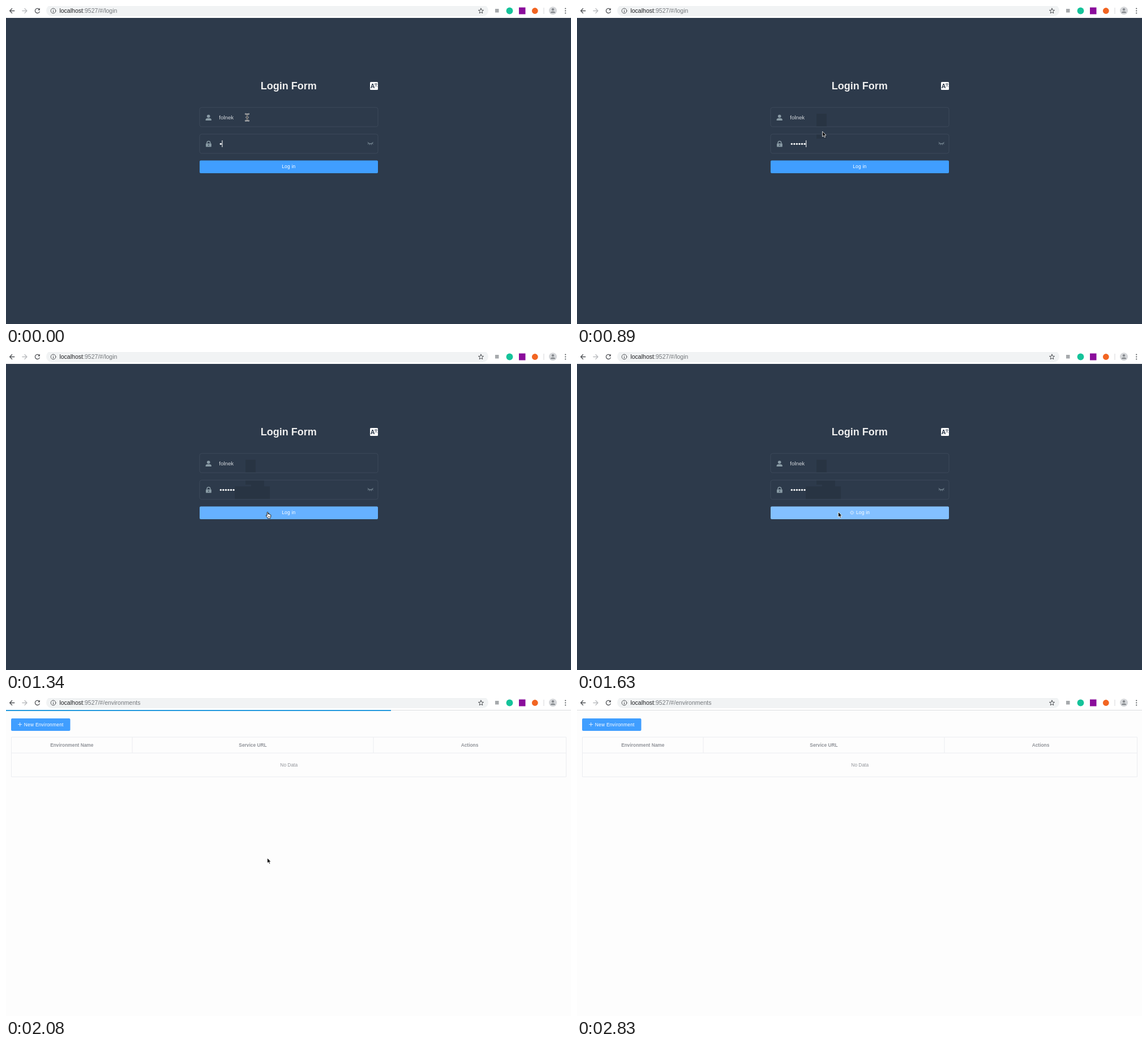
An HTML page that plays this animation: 998 by 561 pixels, repeating every 3.28 s.

```html
<!DOCTYPE html>
<html lang="en">
<head>
<meta charset="utf-8">
<title>Login</title>
<style>
  html, body { margin: 0; width: 100%; height: 100%; overflow: hidden; background: #fdfdfd; }
  svg { display: block; position: absolute; left: 0; top: 0; }
  text { font-family: "Liberation Sans", Arial, sans-serif; font-size: 8.4px; }
  .mid { text-anchor: middle; }
  .btn { fill: #fff; letter-spacing: .25px; }
  .th { fill: #909399; font-weight: bold; text-anchor: middle; }
  .line { fill: none; stroke-linecap: round; stroke-linejoin: round; }
</style>
</head>
<body>
<svg width="998" height="561" viewBox="0 0 998 561">
  <defs>
    <clipPath id="fields">
      <rect x="342" y="179" width="315" height="34" rx="3.5"/>
      <rect x="342" y="226" width="315" height="34" rx="3.5"/>
    </clipPath>
  </defs>

  <g id="login">
    <rect y="21" width="998" height="540" fill="#2d3a4b"/>
    <text class="mid" x="499.3" y="147" style="font-size:18px;font-weight:bold" fill="#eee">Login Form</text>
    <rect x="643" y="134" width="14" height="14" rx="1.5" fill="#fff"/>
    <text x="643.8" y="145.2" style="font-size:10.5px;font-weight:bold" fill="#2d3a4b">A</text>
    <path class="line" d="M651 137.5H656M653.5 136.4V137.5M652 138C652.8 140 654 141.2 655.6 142M655 138C654.4 140 653.2 141.2 651.8 142" stroke="#2d3a4b" stroke-width=".7"/>

    <g id="shades" clip-path="url(#fields)" fill="#283443"></g>
    <g fill="none" stroke="#3c495a">
      <rect x="342" y="179" width="315" height="34" rx="3.5"/>
      <rect x="342" y="226" width="315" height="34" rx="3.5"/>
    </g>

    <g fill="#889aa4">
      <circle cx="357.7" cy="194.5" r="2.8"/>
      <path d="M352.6 202V200.6C352.6 198.6 354.4 198 357.7 198S362.8 198.6 362.8 200.6V202Z"/>
      <path fill-rule="evenodd" d="M353.8 242.4H362Q362.8 242.4 362.8 243.2V247.8Q362.8 248.6 362 248.6H353.8Q353 248.6 353 247.8V243.2Q353 242.4 353.8 242.4ZM357.3 244.3V246.8H358.5V244.3Z"/>
    </g>
    <g class="line" stroke="#889aa4">
      <path d="M355 242.4V241.4A2.9 2.9 0 0 1 360.8 241.4V242.4" stroke-width="1.4"/>
      <path d="M639 240.6Q643.7 245.4 648.4 240.6M640.4 242L639.4 243.6M642.4 243L642 244.8M645 243L645.4 244.8M647 242L648 243.6" stroke-width=".9"/>
    </g>
    <text x="376.3" y="200" style="font-size:9.7px" fill="#d3d7dc">folnek</text>
    <g id="dots" fill="#fff"></g>
    <rect id="caret" y="237" width="1" height="12" fill="#fff"/>

    <rect id="submit" x="342" y="272.5" width="315" height="22.5" rx="2"/>
    <g id="spinner" class="line" stroke="#fff" stroke-width=".8"></g>
    <text id="label" class="btn mid" y="286.4">Log in</text>
  </g>

  <g id="envs">
    <rect y="21" width="998" height="540" fill="#fdfdfd"/>
    <rect y="21" width="998" height="1" fill="#dcdde0"/>
    <rect id="progress" y="21" height="2" fill="#2299dd"/>
    <rect x="9" y="36" width="104.5" height="22" rx="2" fill="#409eff"/>
    <path d="M21.2 46.6H28.2M24.7 43.1V50.1" stroke="#fff" stroke-width=".8"/>
    <text class="btn" x="31.8" y="49.8">New Environment</text>
    <path d="M9.5 69V139H989.5V69ZM9.5 97H989.5M223 69V97M649 69V97" fill="none" stroke="#ebecf0"/>
    <text class="th" x="116.3" y="86.3">Environment Name</text>
    <text class="th" x="436" y="86.3">Service URL</text>
    <text class="th" x="819" y="86.3">Actions</text>
    <text class="mid" x="499.7" y="121.3" fill="#909399">No Data</text>
  </g>

  <g id="toolbar">
    <rect width="998" height="21" fill="#fff"/>
    <rect x="71" y="-2" width="781" height="20" rx="10" fill="#f1f3f4"/>
    <g class="line" stroke="#505357" stroke-width="1.3">
      <path d="M14.8 8.5H6.6M10.6 4.5L6.6 8.5L10.6 12.5"/>
      <path d="M28.8 8.5H37M33 4.5L37 8.5L33 12.5" stroke="#b9bbbe"/>
      <path d="M59.2 10.2A4.1 4.1 0 1 1 58.4 5.5"/>
      <path d="M59.9 3.6V7.4H56.1Z" fill="#505357" stroke="none"/>
      <circle cx="83.5" cy="8.5" r="4.4" stroke-width="1"/>
      <path d="M83.5 8.2V10.7M83.5 6.2V6.3" stroke-width="1.1"/>
      <path id="star" stroke-width="1"/>
    </g>
    <text x="94.4" y="12" style="font-size:10.55px" fill="#74787c"><tspan fill="#202124">localhost</tspan>:9527/#/<tspan id="route"></tspan></text>
    <rect x="864" y="5" width="6.5" height="6.5" fill="#a6a9ac"/>
    <circle cx="889.5" cy="8.5" r="5.9" fill="#15c39a"/>
    <rect x="906" y="2.5" width="11.5" height="12" fill="#8a0d9b"/>
    <circle cx="934.3" cy="8.5" r="5.4" fill="#f26522"/>
    <rect x="949.5" y="3" width="1" height="11" fill="#d5d7da"/>
    <circle cx="966" cy="8.3" r="7" fill="#d5d7da"/>
    <g fill="#84888c">
      <circle cx="966" cy="6.2" r="2.1"/>
      <path d="M961.8 12.2Q962 9.4 966 9.4T970.2 12.2Z"/>
    </g>
    <g fill="#505357">
      <circle cx="988.2" cy="4.5" r="1.1"/>
      <circle cx="988.2" cy="8.5" r="1.1"/>
      <circle cx="988.2" cy="12.5" r="1.1"/>
    </g>
  </g>

  <g id="pointer" stroke-linejoin="round">
    <g id="beam" class="line">
      <path d="M-3-6Q0-6 0-4V4Q0 6-3 6M3-6Q0-6 0-4V4Q0 6 3 6M-1.5 0H1.5" stroke="#fff" stroke-width="2.2"/>
      <path d="M-3-6Q0-6 0-4V4Q0 6-3 6M3-6Q0-6 0-4V4Q0 6 3 6M-1.5 0H1.5" stroke="#222" stroke-width=".8"/>
    </g>
    <path id="arrow" d="M0 0V9.2L2.2 7.2L3.7 10.6L5.2 9.9L3.8 6.7H6.6Z" fill="#000" stroke="#fff" stroke-width=".8"/>
    <g id="hand">
      <path d="M2.1 1.3Q2.1 .3 3 .3T4 1.3V4.2Q5-.0 5.7 4.4Q6.9 3.6 7.2 4.9Q8.6 4.4 8.8 5.8V8.1Q8.8 9.8 7.8 10.5V11.7H3.2V10.6L.4 7.2Q-.1 6.1 .8 5.9Q1.6 5.9 2.1 6.8Z" fill="#fff" stroke="#111" stroke-width=".9"/>
      <path d="M4.2 7.4V9.6M5.6 7.4V9.6M7 7.4V9.6" stroke="#111" stroke-width=".6"/>
    </g>
  </g>
</svg>

<script>
const LOOP = 3280;
const $ = id => document.getElementById(id);

function add(parent, tag, attrs) {
  const el = document.createElementNS("http://www.w3.org/2000/svg", tag);
  for (const k in attrs) el.setAttribute(k, attrs[k]);
  return $(parent).appendChild(el);
}
const show = (el, on) => el.setAttribute("visibility", on ? "inherit" : "hidden");

// Each track: [start, ...values], held until the next start.
const typed = [[0, 1], [150, 2], [300, 3], [450, 4], [600, 6]];
const routes = [[0, "login"], [1930, "management/clusters"], [2080, "environments"]];
const buttons = [[0, "#409eff", 499.3], [1340, "#66b1ff", 499.3], [1630, "#83c0ff", 505.1]];
const loads = [[0, 0], [2080, 680], [2230, 998], [2380, 0]];
const pointers = [
  [0, "beam", 426, 196.5],
  [890, "arrow", 433.5, 221.3],
  [1040, "arrow", 448.5, 262.3],
  [1190, "arrow", 458.5, 278.3],
  [1340, "hand", 459, 282],
  [1480, "arrow", 461.5, 282.2],
  [2230, "arrow", 680, 364.3],
  [2380, "arrow", 864.5, 436.3],
  [2530, "arrow", 918.3, 479.7],
  [2680, "arrow", 981.3, 552.3],
  [2830, "none", 0, 0]
];
// Field shading: [start, left, top, right, bottom]
const shades = [
  [890, 423, 190, 441, 234],
  [1040, 433, 220, 456, 275],
  [1190, 404, 237, 466, 291],
  [1930, 176, 4, 490, 287]
].map(([at, x, y, r, b]) =>
  ({ at, el: add("shades", "rect", { x, y, width: r - x, height: b - y }) }));

const STEP = 4.55;
const dots = Array.from({ length: 6 }, (_, i) =>
  add("dots", "circle", { cx: 379.3 + STEP * i, cy: 243.3, r: 1.65 }));

for (let i = 0; i < 8; i++)
  add("spinner", "path", { d: "M0 -1.9V-3.2", transform: `rotate(${i * 45})` });

const starPoints = Array.from({ length: 10 }, (_, i) => {
  const r = i % 2 ? 2.1 : 4.8, a = i * Math.PI / 5;
  return `${839 + r * Math.sin(a)} ${8.9 - r * Math.cos(a)}`;
});
$("star").setAttribute("d", `M${starPoints.join("L")}Z`);

const at = (track, t) => track.findLast(step => step[0] <= t);

function render(t) {
  const [, count] = at(typed, t);
  dots.forEach((dot, i) => show(dot, i < count));
  $("caret").setAttribute("x", 376.9 + STEP * count);
  show($("caret"), t < 1190);

  shades.forEach(s => show(s.el, t >= s.at));
  $("route").textContent = at(routes, t)[1];
  show($("login"), t < 2080);
  show($("envs"), t >= 2080);

  const [, fill, labelX] = at(buttons, t);
  $("submit").setAttribute("fill", fill);
  $("label").setAttribute("x", labelX);
  show($("spinner"), t >= 1630);
  const turn = Math.floor((t - 1630) / 150) * 27;
  $("spinner").setAttribute("transform", `translate(485.7 283.4) rotate(${turn})`);

  $("progress").setAttribute("width", at(loads, t)[1]);

  const [, kind, x, y] = at(pointers, t);
  $("pointer").setAttribute("transform", `translate(${x} ${y})`);
  for (const id of ["beam", "arrow", "hand"]) show($(id), id === kind);
}

const start = performance.now();
function tick() {
  render((performance.now() - start) % LOOP);
  requestAnimationFrame(tick);
}
tick();
</script>
</body>
</html>
```
